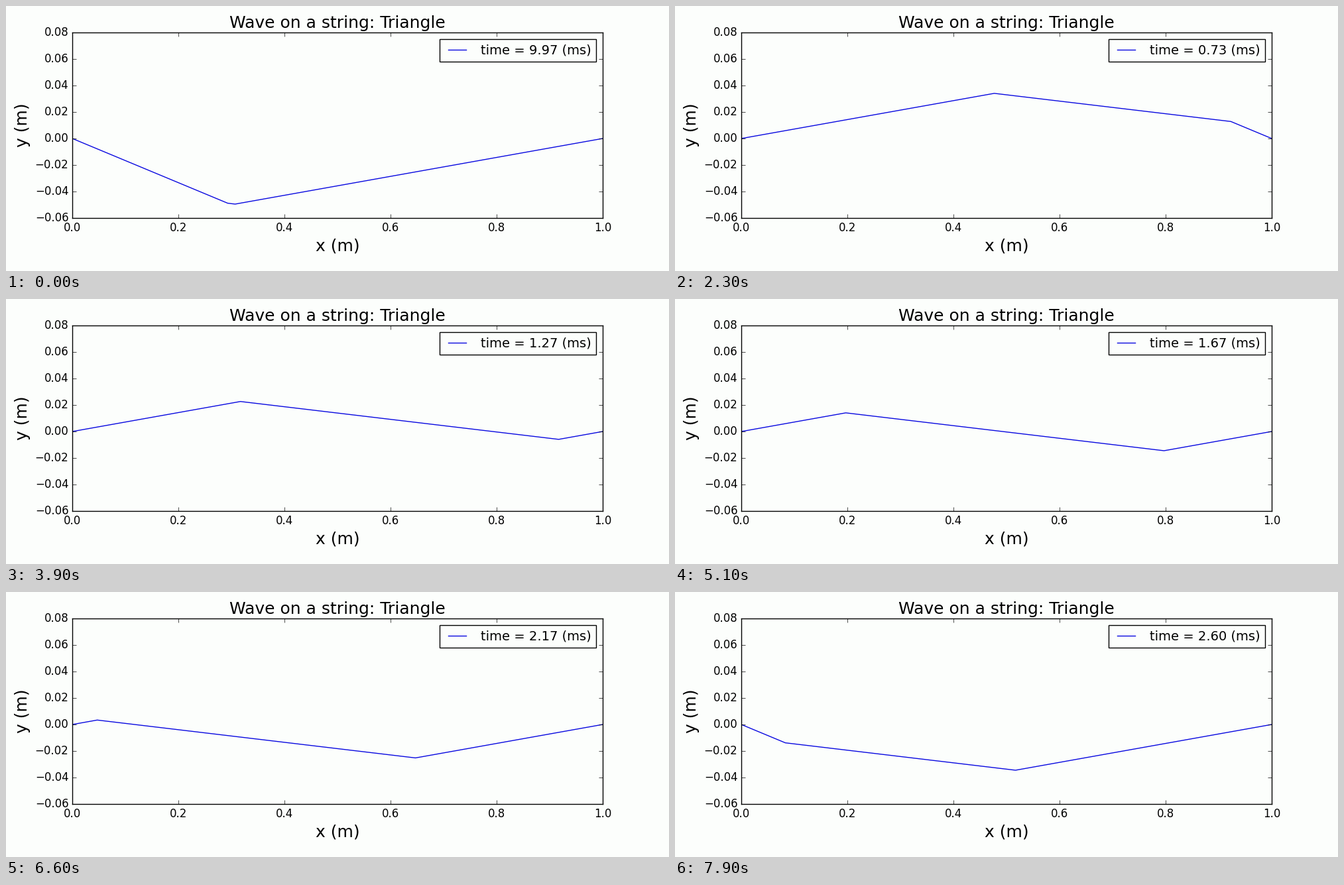
Write a matplotlib script that moves like this. It is 1000 px wide and 400 px high and loops after 8000 ms.

```python
import numpy as np
import matplotlib.pyplot as plt
from matplotlib.animation import FuncAnimation

PAPER = "#fcfefc"
BLUE = "#0808e0"
FRAMES, INTERVAL = 80, 100
STEPS = 300            # time steps in one full 10 ms run
DT = 1 / 30            # ms per step
SPEED = 0.3            # m per ms
LEAD = 0.003           # distance the wave runs ahead of the clock
PLUCK, HEIGHT = 0.7, 0.05

plt.style.use("classic")
plt.rcParams.update({
    "font.family": "DejaVu Sans",
    "figure.dpi": 100,
    "savefig.dpi": "figure",
    "figure.facecolor": PAPER,
    "savefig.facecolor": PAPER,
    "axes.facecolor": PAPER,
})


def wrap(x):
    """Map x into the odd period [-1, 1)."""
    return (x + 1) % 2 - 1


def triangle(x):
    z = wrap(x)
    a = np.abs(z)
    return np.sign(z) * HEIGHT * np.minimum(a / PLUCK, (1 - a) / (1 - PLUCK))


def string_shape(t):
    """Two half-height triangles travelling apart between fixed ends."""
    s = SPEED * t + LEAD
    kinks = np.abs(wrap(np.array([PLUCK - s, PLUCK + s])))
    x = np.sort(np.concatenate(([0, 1], kinks)))
    y = (triangle(x - s) + triangle(x + s)) / 2
    return x, y


fig = plt.figure(figsize=(10, 4), dpi=100)
ax = fig.add_axes([0.1, 0.2, 0.8, 0.7])
ax.set_xlim(0, 1)
ax.set_ylim(-0.06, 0.08)
ax.set_xticks(np.linspace(0, 1, 6))
ax.set_yticks(np.linspace(-0.06, 0.08, 8))
ax.xaxis.set_major_formatter("{x:.1f}")
ax.yaxis.set_major_formatter(
    lambda v, _: f"{round(v, 2) + 0:.2f}".replace("-", "\u2212"))
ax.set_title("Wave on a string: Triangle", fontsize=18)
ax.set_xlabel("x (m)", fontsize=18)
ax.set_ylabel("y (m)", fontsize=18)

line, = ax.plot([], [], color=BLUE, lw=1, label="time = 0.00 (ms)")
legend = ax.legend(loc="upper right", fontsize=14)
clock = legend.get_texts()[0]


def draw(i):
    t = (i - 1) % STEPS * DT
    line.set_data(*string_shape(t))
    clock.set_text(f"time = {t:.2f} (ms)")
    return line, clock


anim = FuncAnimation(fig, draw, frames=FRAMES, interval=INTERVAL,
                     init_func=lambda: draw(0), repeat=True, repeat_delay=0)
plt.show()
```
